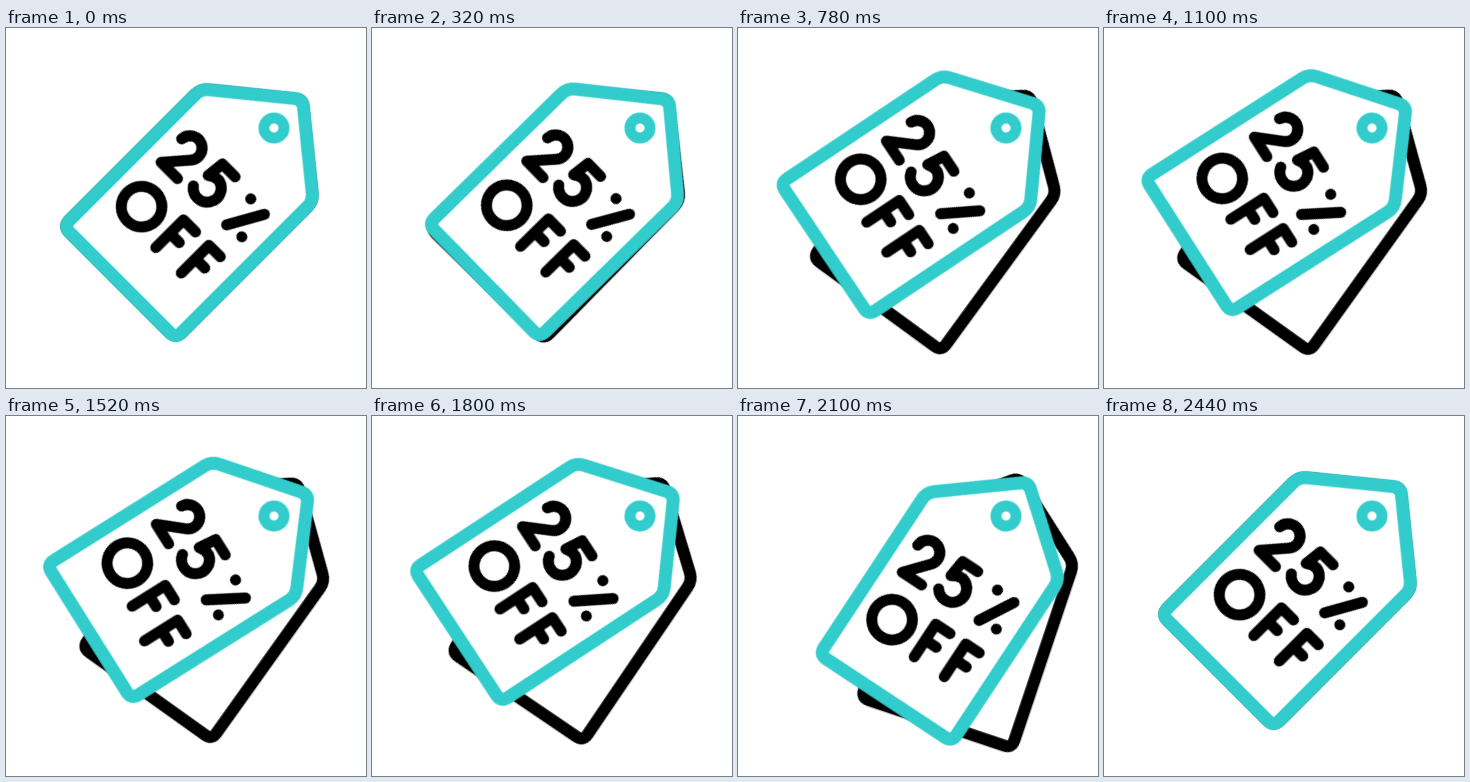
Animation of 360 by 360 pixels, one loop 3000 ms. Source, as an HTML page:

```html
<!DOCTYPE html>
<html lang="en">
<head>
<meta charset="utf-8">
<title>25% off tag</title>
<style>
  html, body { margin: 0; width: 100%; height: 100%; overflow: hidden; background: #fff; }
  svg { display: block; width: 100vw; height: 100vh; }
  g { transform-box: view-box; transform-origin: 0 0; }
</style>
</head>
<body>
<!-- Upright tag with its hole at 0,0 -->
<svg viewBox="-268 -100 360 360" fill="none" stroke-width="11" stroke-linecap="round" stroke-linejoin="round" role="img" aria-label="25% off">
  <g id="back"><path class="tag" fill="#fff" stroke="#000" stroke-width="12"/></g>
  <g id="front" stroke="#33cccc">
    <path class="tag" fill="#fff" stroke-width="13"/>
    <circle r="10"/>
    <g id="label" stroke="#000">
      <g><path d="M-57.5 73 A12.2 12.2 0 1 1 -36.5 82 L-55.5 104 H-32.5"/></g>
      <g><path d="M7 62 H-11 L-13 80 C-9 77 -6 76 -2 76 A14 14 0 1 1 -16 98"/></g>
      <g><path d="M35 102 L54.3 67.7 M33.7 66.5 h.01 M54.2 99.7 h.01"/></g>
      <g><circle cx="-38" cy="149.2" r="20.3"/></g>
      <g><path d="M1 168 V129 H18 M1 148 H14"/></g>
      <g><path d="M37 168 V129 H53 M37 148 H50"/></g>
    </g>
  </g>
</svg>
<script>
const LOOP = 3000;
const REST = 45;
const EXPO = 'cubic-bezier(.87,0,.13,1)';
const SWING = 'cubic-bezier(.87,0,.4,1)';
const SETTLE = 'cubic-bezier(.45,0,.2,1)';
const HOP = { start: 512, stagger: 168, length: 336, drop: 8 };

// Closed outline with each corner softened by radius r
function outline(points, r) {
  const n = points.length;
  const toward = ([ax, ay], [bx, by]) => {
    const k = r / Math.hypot(bx - ax, by - ay);
    return [ax + (bx - ax) * k, ay + (by - ay) * k];
  };
  return points.map((p, i) => {
    const a = toward(p, points[(i + n - 1) % n]);
    const b = toward(p, points[(i + 1) % n]);
    return `${i ? 'L' : 'M'}${a} Q${p} ${b}`;
  }).join(' ') + 'Z';
}

// Steps: [ms, value, easing to the next step]
function play(el, steps, toTransform) {
  el.animate(
    steps.map(([ms, value, easing = 'linear']) => ({
      offset: ms / LOOP, transform: toTransform(value), easing
    })),
    { duration: LOOP, iterations: Infinity }
  );
}

const turn = deg => `rotate(${REST + deg}deg)`;
const shift = y => `translateY(${y}px)`;

const shape = outline([[0, -40.5], [79.3, 24], [79.3, 218.2], [-79.3, 218.2], [-79.3, 24]], 8);
document.querySelectorAll('.tag').forEach(el => el.setAttribute('d', shape));

play(document.getElementById('front'), [
  [0, 0, EXPO], [1200, 12.5], [1500, 12.9], [1700, 12.7, SWING],
  [2090, -11.6, SETTLE], [2440, 0], [LOOP, 0]
], turn);
play(document.getElementById('back'), [
  [0, 0, EXPO], [1100, -9.4], [1650, -9.5, SWING],
  [2090, -26.5, SETTLE], [2440, 0], [LOOP, 0]
], turn);

// The characters dip one after another
document.querySelectorAll('#label > g').forEach((el, i) => {
  const t = HOP.start + i * HOP.stagger;
  play(el, [
    [0, 0], [t, 0, 'ease-in-out'], [t + HOP.length / 2, HOP.drop, 'ease-in-out'],
    [t + HOP.length, 0], [LOOP, 0]
  ], shift);
});
</script>
</body>
</html>
```
